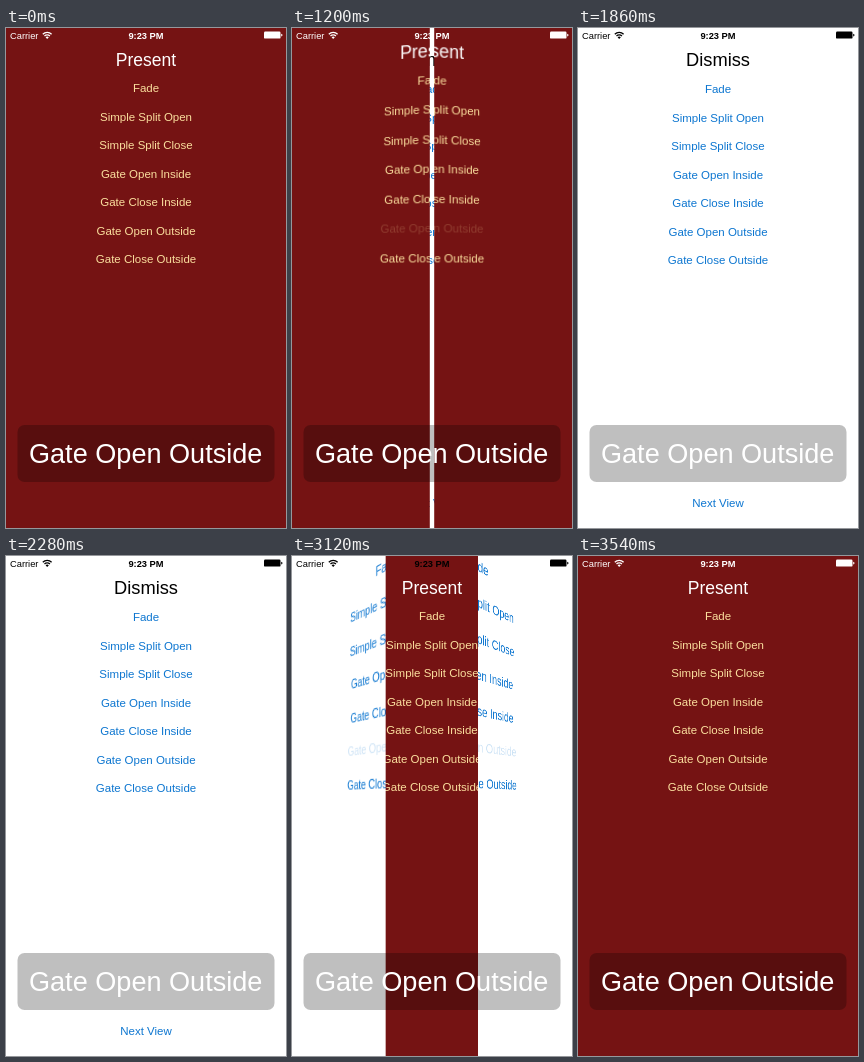
These frames come from a looping animation (280 by 500 pixels, 3600 ms). An HTML page:

```html
<!DOCTYPE html>
<html lang="en">
<head>
<meta charset="utf-8">
<title>Gate Open Outside</title>
<style>
  html, body { margin: 0; width: 100%; height: 100%; overflow: hidden; }
  #stage {
    position: relative; width: 280px; height: 500px; overflow: hidden;
    perspective: 437px; perspective-origin: 140px 250px;
  }
  .layer, .half { position: absolute; top: 0; left: 0; width: 280px; height: 500px; }
  svg { display: block; width: 280px; height: 500px; }
  .half { width: 139px; overflow: hidden; }
  .left { transform-origin: 0 50%; }
  .right { left: 141px; transform-origin: 100% 50%; }
  .right svg { margin-left: -141px; }
  text { font: 11.5px "Liberation Sans", Arial, sans-serif; text-anchor: middle; }
  #bar text { font-size: 9.3px; }
  #bar .arc { fill: none; stroke: currentColor; stroke-width: 1.3; }
</style>
</head>
<body>
<div id="stage">
  <div class="layer" id="under"></div>
  <div class="half left"></div>
  <div class="half right"></div>
  <svg class="layer" id="top" viewBox="0 0 280 500">
    <rect x="11.5" y="397" width="257" height="57" rx="7" fill="#000" fill-opacity=".25"/>
    <text x="139.7" y="435.3" fill="#fff" style="font-size:27.1px">Gate Open Outside</text>
    <g id="bar" fill="currentColor">
      <text x="4" y="10.6" style="text-anchor:start">Carrier</text>
      <path class="arc" d="M36.8 6.3a6.2 6.2 0 0 1 8.8 0M38.5 8a3.8 3.8 0 0 1 5.4 0"/>
      <path d="M39.6 9.2a2.3 2.3 0 0 1 3.2 0l-1.6 1.7z"/>
      <text x="140" y="10.6" font-weight="bold" style="font-weight:bold">9:23 PM</text>
      <rect x="258" y="3.6" width="16.5" height="7" rx="1.2"/>
      <path d="M275.2 5.8q1.3.2 1.3 1.3t-1.3 1.3z"/>
    </g>
  </svg>
</div>
<script>
  const LOOP = 3600, STEP = 60, SWING = 719;
  const rows = ['Fade', 'Simple Split Open', 'Simple Split Close', 'Gate Open Inside',
    'Gate Close Inside', 'Gate Open Outside', 'Gate Close Outside'];
  const present = { title: 'Present', size: 17.5, bg: '#751313', ink: '#fff', link: '#fbdf9e', top: 64 };
  const dismiss = { title: 'Dismiss', size: 18.3, bg: '#fff', ink: '#000', link: '#0d76d0', top: 65, next: true };

  // Each turn: button pressed, then the gate swings from one screen to the other.
  const turns = [
    { from: present, to: dismiss, press: 840, start: 1057, bar: '#fff' },
    { from: dismiss, to: present, press: 2580, start: 2775, bar: '#000' }
  ];

  const label = (y, fill, s, extra = '') => `<text x="140" y="${y}" fill="${fill}" ${extra}>${s}</text>`;

  function page(p, pressed) {
    const list = rows.map((s, i) =>
      label(p.top + i * 28.5, p.link, s, pressed && i === 5 ? 'opacity=".2"' : ''));
    return `<svg viewBox="0 0 280 500"><rect width="280" height="500" fill="${p.bg}"/>` +
      label(38, p.ink, p.title, `style="font-size:${p.size}px"`) + list.join('') +
      (p.next ? label(478.6, p.link, 'Next View') : '') + '</svg>';
  }

  // cubic-bezier(.42, 0, .58, 1)
  function ease(x) {
    let lo = 0, hi = 1;
    for (let i = 0; i < 30; i++) {
      const s = (lo + hi) / 2, r = 1 - s;
      if (1.26 * r * r * s + 1.74 * r * s * s + s * s * s < x) lo = s; else hi = s;
    }
    return lo * lo * (3 - 2 * lo);
  }

  const under = document.getElementById('under');
  const bar = document.getElementById('bar');
  const [left, right] = document.querySelectorAll('.half');

  function fill(el, html) {
    if (el.markup !== html) el.innerHTML = el.markup = html;
  }

  function render(t) {
    const turn = turns.find(k => t < k.start + SWING) || turns[0];
    const done = t >= turns[1].start + SWING;
    const p = done ? 0 : (t - turn.start) / SWING;
    const swinging = p > 0;
    const pressed = !done && t >= turn.press;

    fill(under, swinging ? page(turn.to) : page(turn.from, pressed));
    left.style.display = right.style.display = swinging ? '' : 'none';
    bar.style.color = turn.bar;
    if (!swinging) return;

    const gate = page(turn.from, true);
    const angle = 90 * ease(p);
    fill(left, gate);
    fill(right, gate);
    left.style.transform = `rotateY(${-angle}deg)`;
    right.style.transform = `rotateY(${angle}deg)`;
  }

  const begin = performance.now();
  function tick() {
    const t = (performance.now() - begin + 4) % LOOP;
    render(Math.floor(t / STEP) * STEP);
    requestAnimationFrame(tick);
  }
  tick();
</script>
</body>
</html>
```
